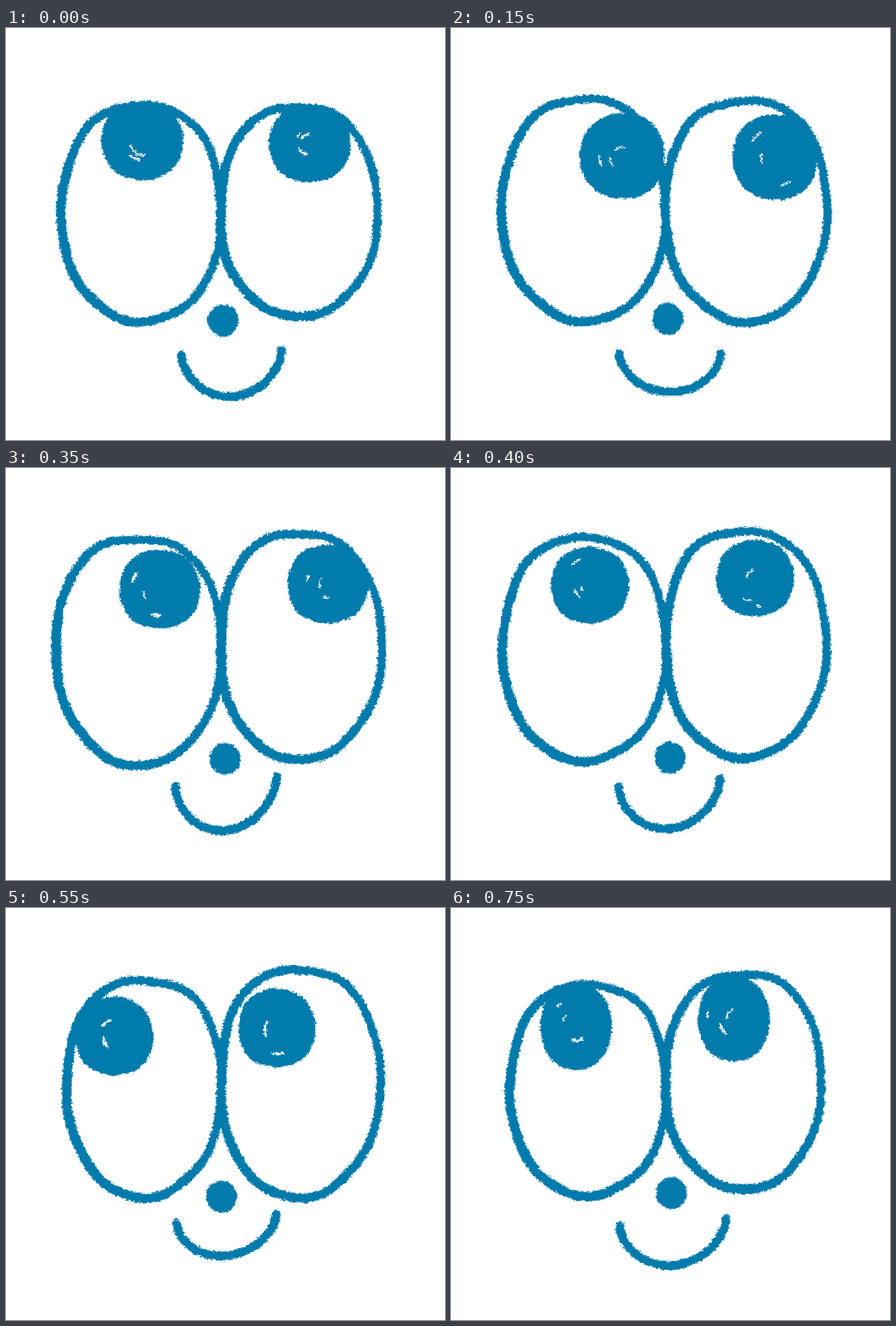
Recreate the animation shown at these times as an HTML page with a canvas. Size 773 px wide and 724 px high, loop 800 ms.

```html
<!DOCTYPE html>
<html lang="en">
<head>
<meta charset="utf-8">
<title>Rolling eyes</title>
<style>
  html, body { margin: 0; width: 100%; height: 100%; overflow: hidden; background: #fff; }
  canvas { display: block; }
</style>
</head>
<body>
<canvas id="stage" width="773" height="724"></canvas>
<script>
const W = 773, H = 724, STEP = 50, LOOP = 800, TAU = 2 * Math.PI;
const BLUE = [0, 123, 172];
const SEAM = 378; // where the two eyes touch

// Key poses. Eyes: outer x, top, bottom. Pupils and nose: centre.
// Size: pupil radii. Mouth: left end, right end, lowest y.
const poses = [
  { at: 0, eyeL: [97, 137, 518], eyeR: [655, 140, 509], pupilL: [240, 199], pupilR: [535, 203],
    size: [72, 68], nose: [382, 514], mouth: [309, 574, 485, 566, 648] },
  { at: 150, eyeL: [89, 126, 517], eyeR: [663, 128, 517], pupilL: [302, 225], pupilR: [571, 227],
    size: [75, 75], nose: [382, 511], mouth: [296, 572, 475, 572, 640] },
  { at: 350, eyeL: [87, 124, 523], eyeR: [662, 116, 514], pupilL: [271, 213], pupilR: [567, 204],
    size: [71, 69], nose: [386, 511], mouth: [298, 560, 477, 542, 637] },
  { at: 450, eyeL: [95, 123, 509], eyeR: [659, 108, 507], pupilL: [215, 202], pupilR: [499, 187],
    size: [66, 66], nose: [384, 507], mouth: [293, 560, 471, 551, 629] },
  { at: 550, eyeL: [106, 127, 509], eyeR: [659, 109, 510], pupilL: [191, 225], pupilR: [477, 211],
    size: [68, 69], nose: [380, 507], mouth: [300, 554, 476, 538, 611] },
  { at: 650, eyeL: [111, 137, 511], eyeR: [648, 115, 504], pupilL: [204, 218], pupilR: [475, 209],
    size: [62, 69], nose: [379, 502], mouth: [296, 561, 472, 556, 613] },
  { at: 750, eyeL: [103, 136, 507], eyeR: [653, 117, 496], pupilL: [220, 209], pupilR: [498, 195],
    size: [63, 75], nose: [388, 501], mouth: [297, 558, 484, 546, 628] }
];

function seeded(seed) {
  return () => {
    seed = (seed + 0x6D2B79F5) | 0;
    let t = Math.imul(seed ^ (seed >>> 15), 1 | seed);
    t = (t + Math.imul(t ^ (t >>> 7), 61 | t)) ^ t;
    return ((t ^ (t >>> 14)) >>> 0) / 4294967296;
  };
}

// Key pose by index, running on into the neighbouring loops.
function keyAt(i) {
  const n = poses.length, lap = Math.floor(i / n), pose = poses[i - lap * n];
  return { ...pose, at: pose.at + lap * LOOP };
}

// Cubic Hermite blend, so that the pupils swing smoothly through the key poses.
function poseAt(time) {
  const i = poses.findLastIndex(p => p.at <= time);
  const [a, b, c, d] = [i - 1, i, i + 1, i + 2].map(keyAt);
  const span = c.at - b.at, k = (time - b.at) / span;
  const blend = part => b[part].map((v, j) => {
    const end = c[part][j];
    const m0 = (end - a[part][j]) / (c.at - a.at) * span;
    const m1 = (d[part][j] - v) / (d.at - b.at) * span;
    const ease = k * k * (3 - 2 * k);
    return v + (end - v) * ease + k * (1 - k) * (m0 * (1 - k) - m1 * k);
  });
  const pose = {};
  for (const part in b) if (part !== 'at') pose[part] = blend(part);
  return pose;
}

// Hand-drawn ellipse; bulge(angle) pushes out its corners.
function ring(cx, cy, rx, ry, bulge, rnd) {
  const p = rnd() * TAU, q = rnd() * TAU;
  return Array.from({ length: 73 }, (_, i) => {
    const a = i / 72 * TAU;
    const r = 1 + bulge(a) * Math.sin(2 * a) ** 2
      + 0.006 * (Math.sin(3 * a + p) + Math.sin(8 * a + q));
    return [cx + rx * r * Math.cos(a), cy + ry * r * Math.sin(a)];
  });
}

function trace(ctx, pts) {
  ctx.beginPath();
  pts.forEach(p => ctx.lineTo(...p));
}

function drawEye(ctx, [outer, top, bottom], rnd) {
  const side = Math.sign(SEAM - outer);
  const bulge = a => 0.03 - 0.035 * Math.sin(a) + 0.015 * side * Math.cos(a);
  const pts = ring((outer + SEAM) / 2, (top + bottom) / 2,
    Math.abs(SEAM - outer) / 2, (bottom - top) / 2, bulge, rnd);
  // The crayon presses harder towards the lower left.
  for (let i = 1; i < pts.length; i++) {
    ctx.lineWidth = 15.5 + 1.5 * Math.cos(i / 72 * TAU - 2.6);
    trace(ctx, [pts[i - 1], pts[i]]);
    ctx.stroke();
  }
}

function drawPupil(ctx, [cx, cy], [rx, ry], rnd) {
  trace(ctx, ring(cx, cy, rx, ry, () => 0.03, rnd));
  ctx.fill();
  // Gaps left by the scribbled filling.
  ctx.globalCompositeOperation = 'destination-out';
  for (let i = 0; i < 3; i++) {
    const r = 0.2 + 0.6 * rnd(), from = 1 + 3 * rnd();
    ctx.lineWidth = 2 + 2.5 * rnd();
    ctx.beginPath();
    ctx.ellipse(cx, cy, rx * r, ry * r, 0, from, from + (0.1 + 0.2 * rnd()) / r);
    ctx.stroke();
  }
  ctx.globalCompositeOperation = 'source-over';
}

function drawMouth(ctx, [x0, y0, x1, y1, low]) {
  const depth = low - (y0 + y1) / 2;
  ctx.lineWidth = 15;
  trace(ctx, Array.from({ length: 31 }, (_, i) => {
    const a = i / 30 * Math.PI, k = (1 - Math.cos(a)) / 2;
    return [x0 + (x1 - x0) * k, y0 + (y1 - y0) * k + depth * Math.abs(Math.sin(a)) ** 1.15];
  }));
  ctx.stroke();
}

function drawFace(ctx, pose, rnd) {
  ctx.lineCap = ctx.lineJoin = 'round';
  drawEye(ctx, pose.eyeL, rnd);
  drawEye(ctx, pose.eyeR, rnd);
  drawPupil(ctx, pose.pupilL, pose.size, rnd);
  drawPupil(ctx, pose.pupilR, pose.size, rnd);
  drawMouth(ctx, pose.mouth);
  trace(ctx, ring(...pose.nose, 27, 28, () => 0, rnd));
  ctx.fill();
}

// Crayon edge: every pixel looks up a neighbour, partly in small clumps.
function crayon(ctx, rnd) {
  const src = ctx.getImageData(0, 0, W, H).data;
  const out = ctx.createImageData(W, H);
  const cols = Math.ceil(W / 4);
  const clump = Array.from({ length: cols * Math.ceil(H / 4) }, () => Math.floor(rnd() * 9));
  for (let y = 2; y < H - 2; y++) {
    for (let x = 2; x < W - 2; x++) {
      const c = clump[(y >> 2) * cols + (x >> 2)];
      const r = Math.floor(rnd() * 9);
      const sx = x + r % 3 + c % 3 - 2;
      const sy = y + Math.floor(r / 3) + Math.floor(c / 3) - 2;
      if (src[(sy * W + sx) * 4 + 3] > 127) {
        const o = (y * W + x) * 4;
        out.data.set(BLUE, o);
        out.data[o + 3] = 255;
      }
    }
  }
  ctx.putImageData(out, 0, 0);
}

function render(step) {
  const canvas = document.createElement('canvas');
  canvas.width = W;
  canvas.height = H;
  const ctx = canvas.getContext('2d', { willReadFrequently: true });
  const rnd = seeded(step * 101 + 7);
  drawFace(ctx, poseAt(step * STEP), rnd);
  crayon(ctx, rnd);
  return canvas;
}

const drawings = Array.from({ length: LOOP / STEP }, (_, step) => render(step));
const stage = document.getElementById('stage').getContext('2d');

function show() {
  const step = Math.floor(performance.now() / STEP) % drawings.length;
  stage.fillStyle = '#fff';
  stage.fillRect(0, 0, W, H);
  stage.drawImage(drawings[step], 0, 0);
  requestAnimationFrame(show);
}
show();
</script>
</body>
</html>
```
